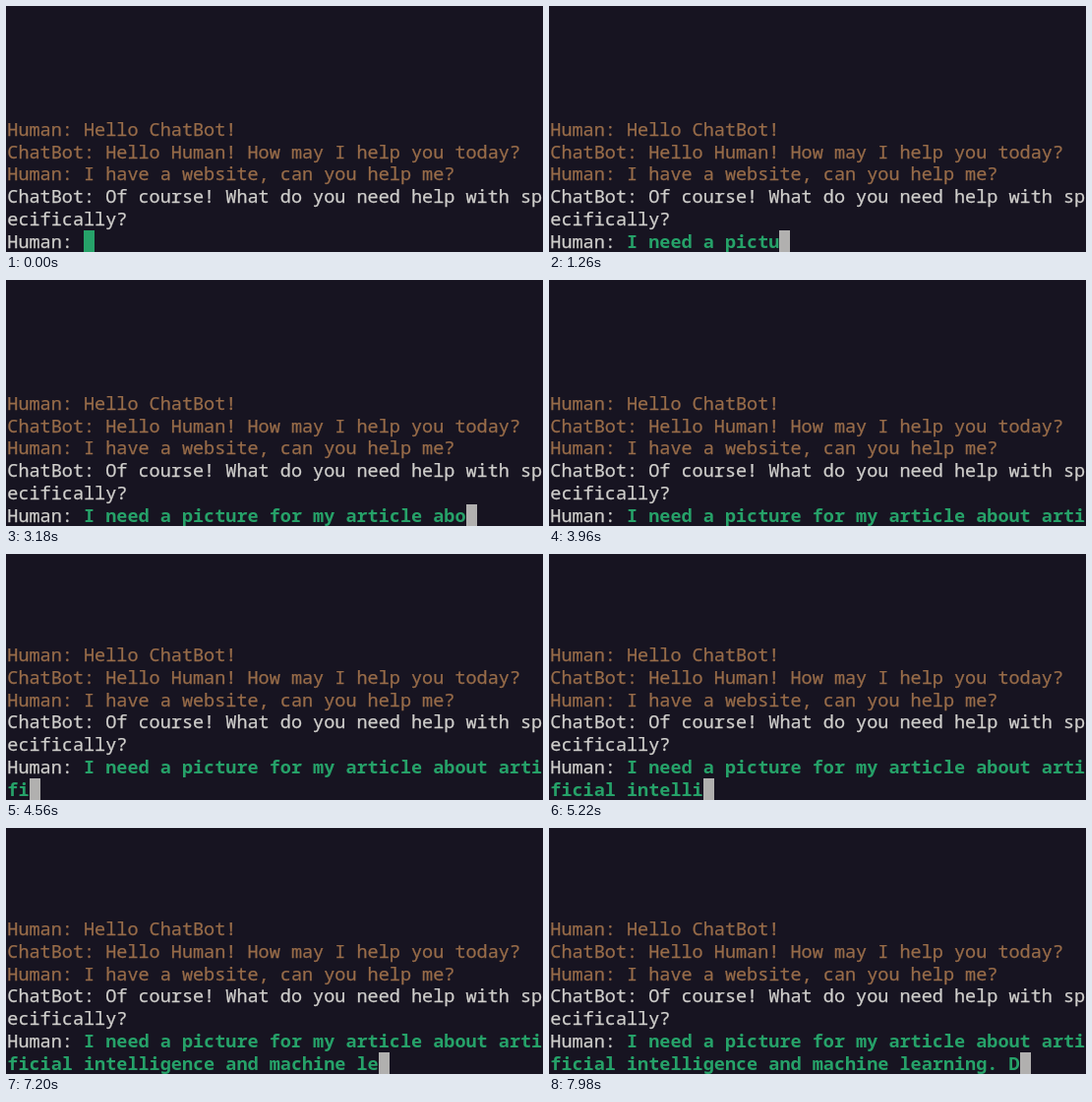
An HTML page that plays this animation: 546x250 px, repeating every 8 s.

```html
<!DOCTYPE html>
<html lang="en">
<head>
<meta charset="utf-8">
<title>Terminal chat</title>
<style>
  html, body { margin: 0; width: 100%; height: 100%; overflow: hidden; background: #171421; }
  #screen { position: relative; width: 545px; height: 250px; overflow: hidden; }
  pre {
    position: absolute; left: 1.3px; bottom: -0.6px; margin: 0;
    font: 18.5px/22.8px "Noto Sans Mono", "DejaVu Sans Mono", monospace;
    font-variant-ligatures: none;
    -webkit-text-stroke: 0.25px;
    color: #d0cfcc;
  }
  .old { color: #986c49; }
  #typed { color: #26a269; font-weight: 600; -webkit-text-stroke: 0; }
  #cursor { position: absolute; bottom: 0; width: 11.1px; height: 22.5px; }
</style>
</head>
<body>
<div id="screen">
<pre><span class="old">Human: Hello ChatBot!
ChatBot: Hello Human! How may I help you today?
Human: I have a website, can you help me?</span>
ChatBot: Of course! What do you need help with sp
ecifically?
Human: <span id="typed"></span></pre>
<div id="cursor"></div>
</div>
<script>
  const LOOP = 8000, CELL = 11.1, COLUMNS = 49, PROMPT = "Human: ";
  // Each burst is typed evenly: first character at start, last one at end (ms).
  const bursts = [
    { text: "I need a pictu", start: 180, end: 1260 },
    { text: "re for my article about ", start: 1320, end: 3360 },
    { text: "arti", start: 3660, end: 3960 },
    { text: "ficial intelli", start: 4500, end: 5220 },
    { text: "gence and ", start: 5400, end: 6060 },
    { text: "machine learning. D", start: 6360, end: 7980 }
  ];
  const typed = document.getElementById("typed");
  const cursor = document.getElementById("cursor");

  function typedPart({ text, start, end }, t) {
    if (t < start) return "";
    const progress = (t - start) / (end - start);
    return text.slice(0, Math.floor(1 + (text.length - 1) * progress + 1e-6));
  }

  function draw(t) {
    const text = bursts.map(burst => typedPart(burst, t)).join("");
    const line = PROMPT + text;
    const rest = line.slice(COLUMNS);
    typed.textContent = line.slice(PROMPT.length, COLUMNS) + (rest && "\n" + rest);
    cursor.style.left = 1.3 + (rest || line).length * CELL + "px";
    cursor.style.background = text ? "#b1b0af" : "#26a269";
  }

  function tick() {
    draw(performance.now() % LOOP);
    requestAnimationFrame(tick);
  }
  tick();
</script>
</body>
</html>
```
